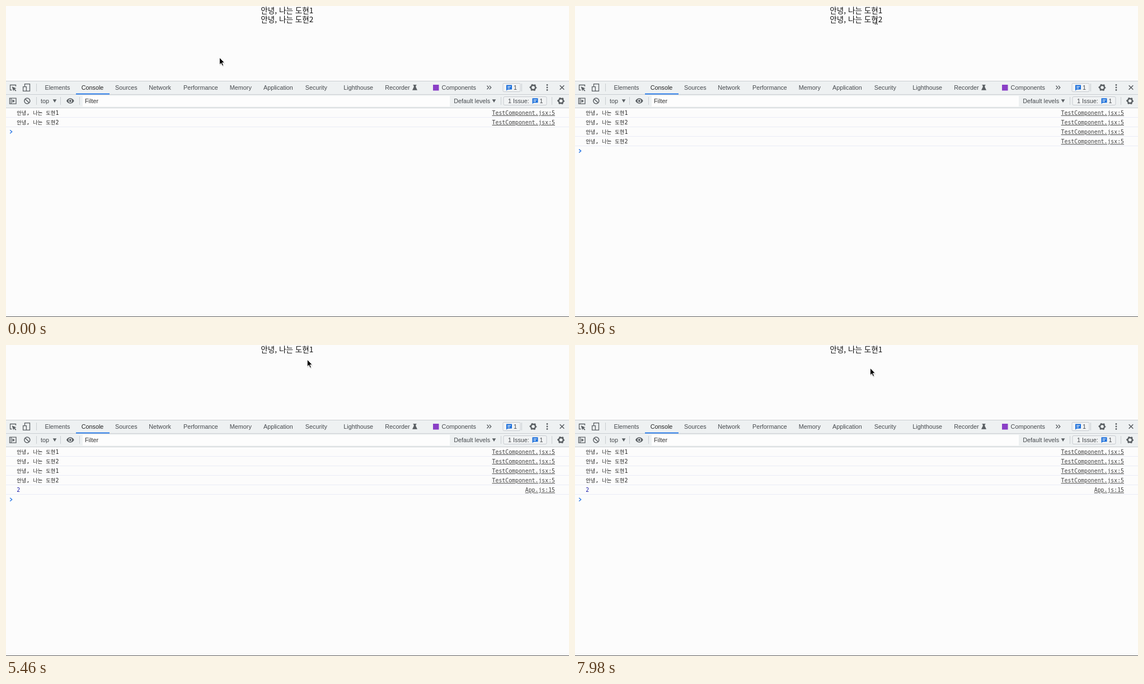
An HTML page for the animation above (8000 ms loop, 1006 px wide and 557 px high).

```html
<!DOCTYPE html>
<html lang="ko">
<head>
<meta charset="utf-8">
<title>Console</title>
<style>
  html, body { margin: 0; width: 100%; height: 100%; overflow: hidden; background: #fcfcfc; }
  svg { display: block; width: 100%; height: 100%; }
  text { white-space: pre; }
  .page { font: 13.6px 'Noto Sans CJK KR', 'Noto Sans CJK JP', 'Noto Sans CJK', sans-serif; text-anchor: middle; fill: #111; }
  .ui { font: 10.8px 'Liberation Sans', Arial, sans-serif; fill: #45494d; }
  .log { font: 9.83px 'DejaVu Sans Mono', 'Noto Sans CJK KR', monospace; fill: #222; }
  .ko { font: 9.3px 'Noto Sans CJK KR', 'Noto Sans CJK JP', 'Noto Sans CJK', sans-serif; }
  .link { text-anchor: end; text-decoration: underline; fill: #444; }
  .line { fill: none; stroke: #5a5f63; stroke-width: 1.3; }
  .solid { fill: #5a5f63; }
  .rule { stroke: #c9cdd1; stroke-width: 1; }
  .badge { fill: #f1f3f4; stroke: #c6cacf; }
</style>
</head>
<body>
<svg viewBox="0 0 1006 557" preserveAspectRatio="none">
  <defs>
    <g id="gear">
      <circle r="4.1" class="line" style="stroke-width:2.6"/>
      <circle r="5.5" class="line" style="stroke-width:1.9" stroke-dasharray="2.5 3.26" stroke-dashoffset="1.25"/>
    </g>
    <path id="chat" d="M0 0H10V8H2.5L0 10.3Z M2 2.3V3.4H8V2.3Z M2 4.8V5.9H6.5V4.8Z" fill="#1a6fdc" fill-rule="evenodd"/>
    <path id="caret" d="M-3.3-2.7H3.3L0 3Z" class="solid"/>
  </defs>
  <rect width="1006" height="557" fill="#fcfcfc"/>

  <rect id="flash" x="0" y="0" width="1005" height="15" fill="#fff" stroke="#5fb6b3" stroke-width="2"/>
  <text class="page" x="502.3" y="13">안녕, 나는 도현1</text>
  <text class="page" id="second" x="502.3" y="29">안녕, 나는 도현2</text>

  <rect y="134" width="1006" height="48" fill="#eef1f2"/>
  <path class="rule" d="M0 134.5H1006M0 158.5H1006M0 182.5H1006M54.5 139V153M921.5 139V153M54.5 163V177M97.5 163V177M131.5 163V177M884.5 163V177M975.5 163V177"/>
  <rect x="137" y="161" width="656" height="19" fill="#fdfdfd"/>
  <rect x="125" y="156.6" width="60" height="1.8" fill="#1a73e8"/>

  <g id="labels" class="ui"></g>

  <!-- tab bar icons -->
  <path class="line" d="M10.5 150.5H7.5V141.5H17.5V144"/>
  <path class="solid" d="M10.5 144.2L18.5 147.4L15.6 148.6L18.4 151.5L17.2 152.7L14.4 149.8L13.3 152.4Z"/>
  <path class="line" d="M33.5 144V139.6H42.5V152.4H37M30.6 144.6H36.4V152.4H30.6Z"/>
  <path class="solid" d="M727.5 141H733.5V142.3H732.3V145.2L735 150.8H726L728.7 145.2V142.3H727.5Z"/>
  <rect x="763" y="141" width="10.5" height="10.5" fill="#8a3fc6"/>
  <path class="line" d="M859.5 142.8L862.6 146L859.5 149.2M863.7 142.8L866.8 146L863.7 149.2"/>
  <rect class="badge" x="888" y="138.5" width="31" height="15" rx="2"/>
  <use href="#chat" x="894" y="141.5"/>
  <use href="#gear" x="942" y="146"/>
  <g class="solid"><circle cx="967" cy="141.5" r="1.4"/><circle cx="967" cy="146" r="1.4"/><circle cx="967" cy="150.5" r="1.4"/></g>
  <path class="line" style="stroke-width:1.6" d="M989.7 142.2L997.3 149.8M997.3 142.2L989.7 149.8"/>

  <!-- console toolbar icons -->
  <path class="line" d="M6.5 165.2H18V175.2H6.5ZM9.2 165.2V175.2"/>
  <path class="solid" d="M11.3 167.2L16 170.2L11.3 173.2Z"/>
  <path class="line" style="stroke-width:1.5" d="M34.3 166.5L41.3 173.5"/>
  <circle class="line" style="stroke-width:1.5" cx="37.8" cy="170" r="5"/>
  <use href="#caret" x="87" y="170"/>
  <path class="solid" d="M108 170C111 163.8 118.6 163.8 121.7 170C118.6 176.2 111 176.2 108 170Z"/>
  <circle cx="114.8" cy="170" r="2.6" fill="#5a5f63" stroke="#eef1f2" stroke-width="1.3"/>
  <use href="#caret" x="872" y="170"/>
  <rect class="badge" x="889" y="162.5" width="77" height="15" rx="2"/>
  <use href="#chat" x="940.5" y="165.3"/>
  <use href="#gear" x="991.7" y="170"/>
  <g id="badges" class="ui"></g>

  <g id="logs" class="log"></g>
  <path id="prompt" d="M7.2-3L10.6 0L7.2 3" fill="none" stroke="#2f7be6" stroke-width="1.5"/>
  <rect y="556" width="1006" height="1" fill="#5c5c5c"/>

  <g id="pointer">
    <g id="arrow">
      <path d="M1 2V15.5L4 12.8L6 17L8.5 16L6.6 11.8H10.6Z" fill="#000" opacity=".14"/>
      <path d="M.5.5V13.3L3.4 10.6L5.5 15.4L7.6 14.5L5.5 9.8H9.4Z" fill="#000" stroke="#fff" stroke-width=".9"/>
    </g>
    <g id="beam" fill="none">
      <path id="beamPath" d="M-2.8-5.7Q-.4-5.7 0-4.6Q.4-5.7 2.8-5.7M0-4.6V4.6M-2.8 5.7Q-.4 5.7 0 4.6Q.4 5.7 2.8 5.7M-1.6 2H1.6" stroke="#fff" stroke-width="2.2" opacity=".6"/>
      <use href="#beamPath" style="display:none"/>
      <path d="M-2.8-5.7Q-.4-5.7 0-4.6Q.4-5.7 2.8-5.7M0-4.6V4.6M-2.8 5.7Q-.4 5.7 0 4.6Q.4 5.7 2.8 5.7M-1.6 2H1.6" stroke="#222" stroke-width="1"/>
    </g>
  </g>
</svg>
<script>
const $ = id => document.getElementById(id);
const show = (el, on) => el.setAttribute('visibility', on ? 'visible' : 'hidden');
const label = ([x, s, y = 150, color = '#45494d']) => `<text x="${x}" y="${y}" style="fill:${color}">${s}</text>`;

$('labels').innerHTML = [
  [69.5, 'Elements'], [134.7, 'Console', 150, '#222'], [195, 'Sources'], [255.3, 'Network'],
  [317, 'Performance'], [399.8, 'Memory'], [460, 'Application'], [534.8, 'Security'],
  [603.3, 'Lighthouse'], [677.2, 'Recorder'], [778.6, 'Components'],
  [62, 'top', 174], [141, 'Filter', 174, '#333'], [800.3, 'Default levels', 174],
].map(label).join('');
$('badges').innerHTML = [[907, '1'], [897, '1 Issue:', 174], [953.5, '1', 174]].map(label).join('');

// Console rows: [time shown, message, link]
const greet = (time, n) => [time, `안녕, 나는 도현${n}`, 'TestComponent.jsx:5'];
const rows = [greet(0, 1), greet(0, 2), greet(2700, 1), greet(2700, 2), [4740, '2', 'App.js:15']];
const PITCH = 17.15;

$('logs').innerHTML = rows.map(([, msg, link], i) => {
  const y = 194.8 + i * PITCH;
  const text = msg.replace(/[가-힣]+/g, '<tspan class="ko">$&</tspan>');
  const color = msg === '2' ? '#1a1aa6' : '#222';
  const rule = Math.round(199 + i * 17) + .5;
  return `<g><path d="M0 ${rule}H1006" stroke="#e9ecf6"/>
    <text x="19.3" y="${y}" style="fill:${color}">${text}</text>
    <text class="link" x="981" y="${y}">${link}</text></g>`;
}).join('');
const rowEls = [...$('logs').children];

// Pointer path: [start, end, x, y] eases to each place in turn
const home = [381, 91.8];
const moves = [
  [700, 1300, 405.8, 81],
  [1520, 1900, 545, 33],
  [2360, 2700, 538.3, 27],
  [4480, 4740, 537.8, 25.5],
  [6140, 6600, 527, 40.8],
];

function pointerAt(t) {
  let [x, y] = home;
  for (const [start, end, toX, toY] of moves) {
    const p = Math.min(1, Math.max(0, (t - start) / (end - start)));
    const e = p * p * (3 - 2 * p);
    x += (toX - x) * e;
    y += (toY - y) * e;
  }
  return [x, y];
}

function draw(now) {
  const t = now % 8000;
  const [x, y] = pointerAt(t);
  const removed = t >= 4740;
  const overText = !removed && y < 36 && x > 456;

  $('pointer').setAttribute('transform', `translate(${x} ${y})`);
  show($('arrow'), !overText);
  show($('beam'), overText);
  show($('second'), !removed);
  show($('flash'), removed && t < 5440);

  rows.forEach(([time], i) => show(rowEls[i], t >= time));
  const count = rows.filter(([time]) => t >= time).length;
  $('prompt').setAttribute('transform', `translate(0 ${191 + count * PITCH})`);
  requestAnimationFrame(draw);
}
requestAnimationFrame(draw);
</script>
</body>
</html>
```
